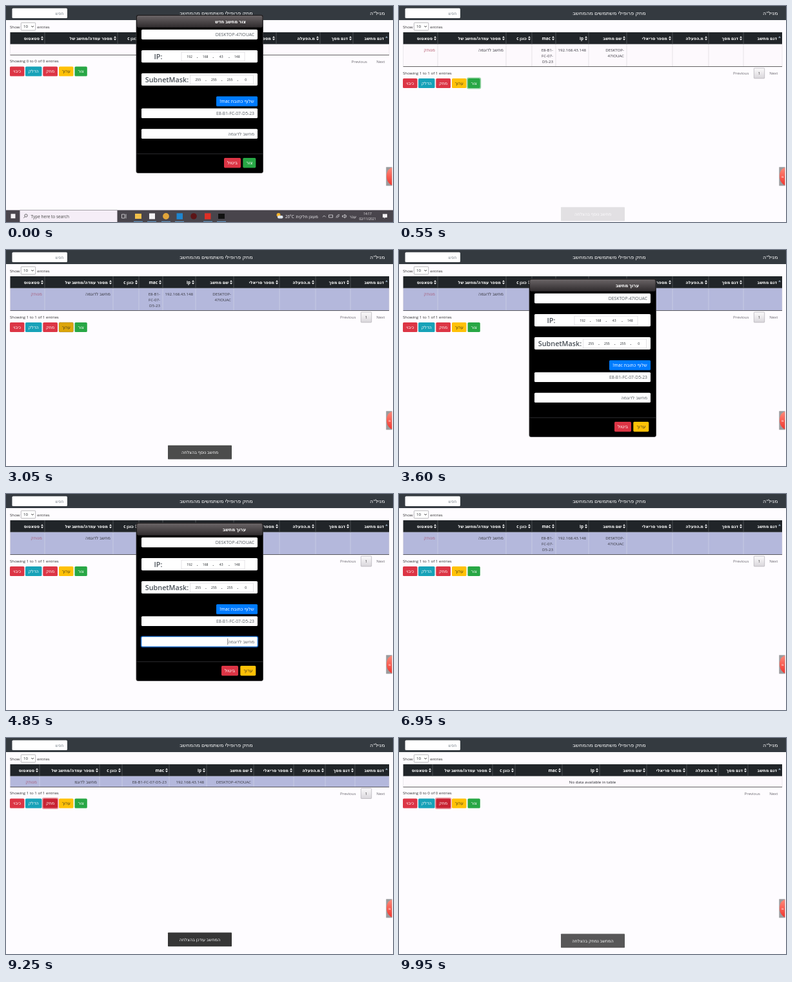
Write an HTML page that moves like this. It is 600 by 337 pixels and loops after 10 s.

```html
<!DOCTYPE html>
<html lang="he">
<head>
<meta charset="utf-8">
<style>
html, body { margin: 0; width: 100%; height: 100%; overflow: hidden; background: #fefcff; }
svg { display: block; width: 100vw; height: 100vh; font-family: 'Open Sans', 'Noto Sans', 'DejaVu Sans', sans-serif; }
</style>
</head>
<body>
<svg id="stage" viewBox="0 0 600 337"></svg>
<script>
const LOOP = 10000;
const stage = document.getElementById('stage');
const pen = document.createElement('canvas').getContext('2d');
const RED = '#dc3545', TEAL = '#17a2b8', YELLOW = '#ffc107', GREEN = '#28a745', BLUE = '#007bff';
const FIELD_SIZE = 6.8;

// ---- timing ----
const clamp = v => Math.max(0, Math.min(1, v));
const ramp = (t, start, len) => clamp((t - start) / len);
const between = (t, a, b) => t >= a && t < b;

function bezier(x1, y1, x2, y2) {
  const at = (u, a, b) => 3 * u * (1 - u) * (1 - u) * a + 3 * u * u * (1 - u) * b + u * u * u;
  return x => {
    let lo = 0, hi = 1;
    for (let i = 0; i < 20; i++) {
      const mid = (lo + hi) / 2;
      if (at(mid, x1, x2) < x) lo = mid; else hi = mid;
    }
    return at(lo, y1, y2);
  };
}
const ease = bezier(.25, .1, .25, 1);
const easeOut = bezier(0, 0, .58, 1);

// ---- drawing helpers ----
const rect = (x, y, w, h, fill, more = '') =>
  `<rect x="${x}" y="${y}" width="${w}" height="${h}" fill="${fill}" ${more}/>`;
const line = (x1, y1, x2, y2, color, w = .5) =>
  `<path d="M${x1} ${y1}L${x2} ${y2}" stroke="${color}" stroke-width="${w}"/>`;
const dot = (x, y, r, fill) => `<circle cx="${x}" cy="${y}" r="${r}" fill="${fill}"/>`;
const path = (d, fill, more = '') => `<path d="${d}" fill="${fill}" ${more}/>`;

// align: l, c or r, meaning the visual side whatever the script
function text(x, y, s, { size, fill = '#212529', align = 'l', bold = 400 } = {}) {
  const rtl = /[\u0590-\u05ff]/.test(s);
  const anchor = align === 'c' ? 'middle' : (align === 'l') !== rtl ? 'start' : 'end';
  return `<text x="${x}" y="${y}" font-size="${size || (rtl ? 6.5 : 6.15)}" fill="${fill}" font-weight="${bold}" ` +
    `text-anchor="${anchor}" direction="${rtl ? 'rtl' : 'ltr'}">${s}</text>`;
}

function button(x, y, w, h, label, fill, { color = '#fff', ring = '', dotted = false, size } = {}) {
  const halo = ring ? rect(x - .7, y - .7, w + 1.4, h + 1.4, 'none', `rx="2" stroke="${ring}" stroke-opacity=".5" stroke-width="1.4"`) : '';
  const edge = dotted ? 'stroke="#5c4a10" stroke-width=".5" stroke-dasharray="1 .8"' : '';
  return halo + rect(x, y, w, h, fill, 'rx="1.6" ' + edge) +
    text(x + w / 2, y + h / 2 + 2.3, label, { fill: color, align: 'c', size });
}

// ---- page ----
function navbar() {
  return rect(0, 0, 600, 22, '#343a40') + rect(9.5, 3.5, 85.5, 15.5, '#fff', 'rx="1.6"') +
    text(89.5, 13.7, 'חפש', { fill: '#7c858d', align: 'r' }) +
    text(326, 14, 'מחק פרופילי משתמשים מהמחשב', { size: 8, fill: '#fff', align: 'c' }) +
    text(587.5, 14, 'מניל"ה', { size: 8, fill: '#fff', align: 'r' });
}

const HEADS = ['סטאטוס', 'מספר עמדה/מחשב של', 'כונן c', 'mac', 'ip', 'שם מחשב', 'מספר סריאלי', 'מ.הפעלה', 'דגם מסך', 'דגם מחשב'];
const COLS = {
  start: [60, 173, 212, 245, 290, 345, 419, 487, 538, 594],
  tall: [60, 166, 206, 243, 294, 353, 424, 480, 534, 594],
  flat: [52, 145, 180, 253, 311, 384, 446, 495, 541, 594]
};

function table({ cols, row, selected, note, edited }) {
  const edges = COLS[cols];
  const bottom = cols === 'tall' ? 94.5 : 76.5;
  let out = rect(6.5, 41, 587.5, 18.7, '#212529');
  out += rect(6.5, 59.7, 587.5, bottom - 59.7, selected ? '#b4b8dc' : '#fdf9fd');
  edges.forEach((x, i) => {
    const last = i === 9;
    out += text(x - 8, 53, HEADS[i], { size: 6.4, fill: '#fff', align: 'r', bold: 700 });
    out += path(`M${x - 6} 49.8h4l-2 -2.7z`, last ? '#8fa3b5' : '#e8e8ea');
    if (!last) {
      out += path(`M${x - 6} 51h4l-2 2.7z`, '#e8e8ea') + line(x, 41, x, 59.7, '#666b70', .6);
      if (row) out += line(x, 60, x, bottom, selected ? '#d5d7ea' : '#d9d5da', .6);
    }
  });
  out += line(6.5, 60, 6.5, bottom, '#d9d5da') + line(594, 60, 594, bottom, '#d9d5da') +
    line(6.5, bottom, 594, bottom, '#222', .7);
  if (row) {
    const cell = (i, lines, fill = '#34343c') => lines.map((s, k) =>
      text(edges[i] - 4, 70.5 + 9 * k, s, { fill, align: 'r' })).join('');
    const tall = cols === 'tall';
    out += cell(0, ['מנותק'], selected ? '#a8627f' : '#b5566c') +
      cell(1, [edited ? 'מחשב לדוגמ' : 'מחשב לדוגמה']) +
      cell(3, tall ? ['E8-B1-', 'FC-07-', 'D5-23'] : ['E8-B1-FC-07-D5-23']) +
      cell(4, ['192.168.43.148']) +
      cell(5, tall ? ['DESKTOP-', '47IOUAC'] : ['DESKTOP-47IOUAC']);
  } else if (note) {
    out += text(300, 70.5, 'No data available in table', { align: 'c' });
  }
  return out;
}

function controls(v) {
  const y = v.cols === 'tall' ? 18.5 : 0;
  const n = v.row ? 1 : 0;
  const grey = { fill: '#6b6870' };
  let out = text(6, 34.7, 'Show', { fill: '#333' }) +
    rect(23.3, 26, 22.4, 12, '#fff', 'rx="1.2" stroke="#8b8b8f" stroke-width=".6"') +
    text(27, 34.4, '10') +
    path('M39.2 31l1.9 2l1.9 -2', 'none', 'stroke="#222" stroke-width=".8"') +
    text(48.3, 34.7, 'entries', { size: 6, fill: '#333' }) +
    text(6, 88.4 + y, `Showing ${n} to ${n} of ${n} entries`, { fill: '#333' }) +
    text(n ? 542.5 : 560, 88.6 + y, 'Previous', { ...grey, align: 'r' }) +
    text(587.5, 88.6 + y, 'Next', { ...grey, align: 'r' });
  if (n) out += rect(550.3, 78.5 + y, 16.4, 16, 'url(#page)', 'rx=".8" stroke="#a5a2a8" stroke-width=".6"') +
    text(558.5, 88.6 + y, '1', { align: 'c', fill: '#333' });
  const ring = (name, color) => v.focus === name ? color : '';
  const by = 94.5 + y;
  return out +
    button(6, by, 22.5, 15, 'כיבוי', RED) +
    button(30, by, 25.5, 15, 'הדלק', TEAL) +
    button(57.3, by, 22.7, 15, 'מחק', v.focus === 'delete' ? '#c82333' : RED, { ring: ring('delete', RED) }) +
    button(82, by, 22.5, 15, 'ערוך', v.pressed ? '#dda60a' : YELLOW, { color: '#3a3420', ring: ring('edit', YELLOW), dotted: v.pressed }) +
    button(106.5, by, 19.3, 15, 'צור', GREEN, { ring: ring('create', GREEN) });
}

function sideTab(label) {
  return rect(589.3, 251.3, 9.2, 29.2, '#9b9b9d') +
    path('M598.3 252C592 254 590 260 590 265.5C590 272 593 277 598.3 279.8z', 'url(#tab)') +
    text(594.5, 268, label, { size: 4.6, fill: '#fff', align: 'c' });
}

// ---- dialog ----
function field(y, s, glow, caret) {
  let out = rect(210, y, 180, 15.4, '#fff', 'rx="1.6"');
  if (glow) out += rect(209.5, y - .5, 181, 16.4, 'none', `rx="2" stroke="${BLUE}" stroke-opacity="${.6 * glow}" stroke-width="1.6"`) +
    rect(210.2, y + .2, 179.6, 15, 'none', `rx="1.6" stroke="#80bdff" stroke-opacity="${glow}" stroke-width=".5"`);
  out += text(385, y + 10.2, s, { size: FIELD_SIZE, fill: '#555b61', align: 'r' });
  if (caret !== undefined) out += line(caret, y + 2.7, caret, y + 12.5, '#222', .6);
  return out;
}

function octets(y, label, labelX, x, values) {
  let out = rect(210, y, 180, 19.2, '#fff', 'rx="1.6"') +
    text(labelX, y + 14, label, { size: 10.8, bold: 600, fill: '#495057', align: 'c' }) +
    rect(x, y + 3, 98, 14, '#fff', 'stroke="#d3d0d6" stroke-width=".6"');
  values.forEach((v, i) => {
    const cx = x + 12.5 + 24.6 * i;
    out += text(cx, y + 11.8, v, { size: 5, align: 'c' });
    if (i < 3) out += text(cx + 12.2, y + 12, '.', { size: 7, align: 'c', bold: 600 });
  });
  return out;
}

function dialog({ top, alpha, title, name, ok, glow1 = 0, glow2 = 0, caret1, caret2 }) {
  const wide = ok === 'ערוך';
  const okX = wide ? 363.3 : 367.3;
  const size = 7;
  return `<g transform="translate(0 ${top - 45})" opacity="${alpha}">` +
    rect(202, 45, 196.5, 246.5, '#000', 'rx="2.4" stroke="#3a383b" stroke-width=".8"') +
    rect(203, 46, 194.6, 18.6, 'url(#head)', 'rx="2"') +
    text(372, 58.4, title, { size: 6.9, fill: '#fff', align: 'r', bold: 700 }) +
    field(67.8, 'DESKTOP-47IOUAC', glow1, caret1) +
    octets(100, 'IP:', 236, 272, [192, 168, 43, 148]) +
    octets(136, 'SubnetMask:', 249.5, 285.3, [255, 255, 255, 0]) +
    button(326, 172, 64, 15.6, 'שלוף כתובת mac!', BLUE, { size }) +
    field(190.7, 'E8-B1-FC-07-D5-23') +
    field(222.7, name, glow2, caret2) +
    line(202.5, 261.7, 398, 261.7, '#4b4b4f', .6) +
    button(okX - 29.3, 268, 26, 15.4, 'ביטול', RED, { size }) +
    button(okX, 268, 387.3 - okX, 15.4, ok, wide ? YELLOW : GREEN, { color: wide ? '#3a3420' : '#fff', size }) + '</g>';
}

function createDialog(t) {
  const alpha = 1 - ramp(t, 50, 150);
  return alpha ? dialog({ top: 14, alpha, title: 'צור מחשב חדש', name: 'מחשב לדוגמה', ok: 'צור' }) : '';
}

function editDialog(t) {
  const alpha = ramp(t, 3070, 150) * (1 - ramp(t, 6650, 150));
  if (!alpha) return '';
  const top = 25 + 20 * (easeOut(ramp(t, 3070, 300)) - easeOut(ramp(t, 6650, 300)));
  const name = t < 5550 ? 'מחשב לדוגמה' : 'מחשב לדוגמ';
  pen.font = FIELD_SIZE + "px 'Open Sans','Noto Sans','DejaVu Sans',sans-serif";
  const blink = since => t >= since && Math.floor((t - since) / 500) % 2 === 0;
  return dialog({
    top, alpha, title: 'ערוך מחשב', name, ok: 'ערוך',
    glow1: ramp(t, 3620, 150) * (1 - ramp(t, 4700, 150)),
    glow2: ramp(t, 4700, 150) * (1 - ramp(t, 6600, 150)),
    caret1: t < 4700 && blink(3650) ? 384.6 : undefined,
    caret2: t < 6600 && blink(4800) ? 384.6 - pen.measureText(name).width : undefined
  });
}

// ---- toast ----
const TOASTS = [
  ['מחשב נוסף בהצלחה', 490, 3000, 430],
  ['המחשב עודכן בהצלחה', 7080, 9240, 420],
  ['המחשב נמחק בהצלחה', 9695, 12200, 500]
];
function toast(t) {
  return TOASTS.map(([label, start, end, out]) => {
    const k = ease(ramp(t, start, 500)) - ease(ramp(t, end, out));
    if (k <= .001) return '';
    return `<g transform="translate(0 ${12 * (1 - k)})" opacity="${k}">` +
      rect(251, 303.3, 99, 21.8, '#333', 'rx=".8"') +
      text(300.5, 316.5, label, { fill: '#fff', align: 'c' }) + '</g>';
  }).join('');
}

// ---- desktop bar ----
function taskbar() {
  const ink = '#f4f2f5';
  const stroke = color => `stroke="${color}" stroke-width=".7"`;
  const label = (x, y, s, size, align) => text(x, y, s, { size, align, fill: ink });
  return rect(0, 318.5, 600, 18.5, '#49454c') +
    rect(7.5, 324.3, 7, 7, ink) +
    rect(21.5, 319, 151, 18, '#f5eef7') +
    `<circle cx="31" cy="327" r="2.2" fill="none" ${stroke('#333')}/>` + path('M29.4 328.6l-2 2.2', 'none', stroke('#333')) +
    text(38.5, 330.8, 'Type here to search', { size: 6.5, fill: '#444' }) +
    path('M179.5 325h4.5v6h-4.5zM186 324.5v7', 'none', stroke(ink)) +
    rect(200, 324, 10, 8, '#f2c04b') + rect(222, 323.5, 9, 9, ink) +
    dot(248, 328, 4.9, '#e2a53a') + rect(264.5, 323.3, 9.5, 9.5, '#1f86d0') +
    dot(291, 328, 4.8, '#5c1517') + rect(308, 323.3, 9.5, 9.5, '#dd3026') + rect(329, 324, 10, 8, '#111') +
    [205, 226, 248, 269, 313, 334].map(x => line(x - 7, 336.3, x + 7, 336.3, '#6cb4ea', .9)).join('') +
    dot(422.5, 326, 3, '#f5b32c') + rect(421, 327, 8.5, 4.4, '#dfe6ee', 'rx="2"') +
    label(433, 330.8, '26°C', 6.2) + label(484, 330.8, 'מעונן חלקית', 6.5, 'r') +
    path('M491 329.3l2.3 -2.3l2.3 2.3M500.5 326h6v4h-6zM512 330.5a5 5 0 0 1 5 -5M514 330.5a3 3 0 0 1 3 -3M521.5 327h2l2 -2v6l-2 -2h-2zM527 326q1.5 2 0 4', 'none', stroke(ink)) +
    label(543, 330.5, 'עבר', 6, 'r') +
    label(560.5, 326.3, '14:17', 4.9, 'c') + label(560.5, 334.3, '02/11/2021', 4.9, 'c') +
    path('M584 324.5h7v5.5h-3l-1.5 1.7v-1.7h-2.5z', ink);
}

const DEFS = '<defs>' +
  [['head', '#6a6466', '#2f2b2d'], ['page', '#fbfafb', '#d9d6db'], ['tab', '#ff8a7a', '#f0362f']].map(([id, a, b]) =>
    `<linearGradient id="${id}" x2="0" y2="1"><stop stop-color="${a}"/><stop offset="1" stop-color="${b}"/></linearGradient>`).join('') +
  '</defs>';

function view(t) {
  const row = between(t, 350, 9600);
  const focus = between(t, 350, 2900) ? 'create' : between(t, 7000, 9000) ? 'edit' : t >= 9000 ? 'delete' : '';
  return {
    row, focus,
    cols: t < 350 ? 'start' : t < 7050 ? 'tall' : 'flat',
    selected: row && t >= 2350,
    edited: t >= 7050,
    note: t >= 9600,
    pressed: between(t, 2900, 3150)
  };
}

let shown = '';
function draw(t) {
  const v = view(t);
  const windowed = t < 350;
  const markup = DEFS + rect(0, 0, 600, 337, '#fefcff') + navbar() + table(v) + controls(v) +
    sideTab(windowed ? '' : 'צו') + createDialog(t) + editDialog(t) + toast(t) + (windowed ? taskbar() : '');
  if (markup !== shown) stage.innerHTML = shown = markup;
}

const begin = performance.now();
function tick() {
  draw((performance.now() - begin) % LOOP);
  requestAnimationFrame(tick);
}
tick();
</script>
</body>
</html>
```
